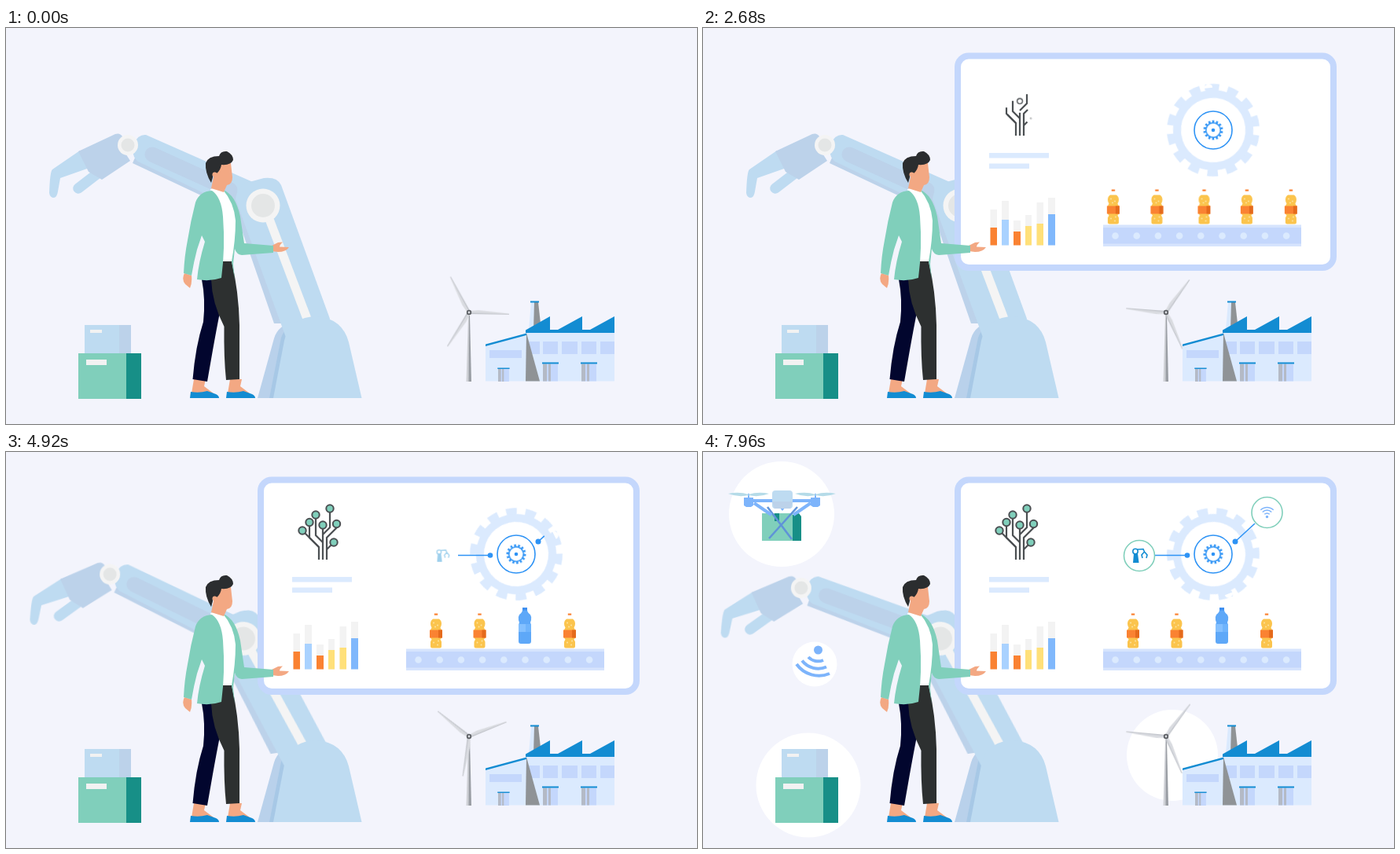
These frames come from a looping animation (879 px wide and 504 px high, 8 s). An HTML page without scripts:

```html
<!DOCTYPE html>
<html lang="en">
<head>
<meta charset="utf-8">
<title>Smart factory</title>
<style>
html, body { margin: 0; width: 100%; height: 100%; overflow: hidden; background: #f3f4fc; }
svg { display: block; width: 100vw; height: 100vh; }
svg * { animation: 8s ease-in-out infinite both; }

.sky { fill: #bedbf1; }
.haze { fill: #bcd2ea; }
.pale { fill: #dbeafe; }
.peri { fill: #c4d7fc; }
.blue { fill: #138cd2; }
.mint { fill: #80cfbb; }
.teal { fill: #178f87; }
.skin { fill: #f3a883; }
.fog { fill: #f4f4f4; }
.stone { fill: #e4e6e6; }
.white { fill: #fff; }
.line { fill: none; stroke: #2e93f5; stroke-width: 1.6; }
.azure { fill: #2e93f5; }

/* groups hidden until their delayed parts start */
.soon { animation-name: soon; animation-timing-function: step-end; }
.mid { animation-name: mid; animation-timing-function: step-end; }
.late { animation-name: late; animation-timing-function: step-end; }
@keyframes soon { 0% { opacity: 0 } 10.5%, 100% { opacity: 1 } }
@keyframes mid { 0% { opacity: 0 } 20%, 100% { opacity: 1 } }
@keyframes late { 0% { opacity: 0 } 50%, 100% { opacity: 1 } }

.pop, .bar, .wipe, .node, .dot, .disc, .icon, .tall { transform-box: fill-box; transform-origin: center; }
.pop { animation-name: pop; }
.bar { transform-origin: bottom; animation-name: bar; }
.wipe { transform-origin: left; animation-name: wipe; }
@keyframes pop { 0%, 13% { transform: scale(0) } 18.5%, 100% { transform: none } }
@keyframes bar { 0%, 14% { transform: scaleY(0) } 20%, 100% { transform: none } }
@keyframes wipe { 0%, 13% { transform: scaleX(0) } 18.5%, 100% { transform: none } }

.panel { fill: #fff; stroke: #c4d7fc; stroke-width: 8; animation-name: wide, high; }
@keyframes wide {
  0%, .5% { width: 0; animation-timing-function: ease-in }
  10.5% { width: 385px; animation-timing-function: ease-out }
  15% { width: 490px } 21%, 100% { width: 478px }
}
@keyframes high {
  0%, .5% { height: 0; animation-timing-function: ease-in }
  10.5% { height: 215px; animation-timing-function: ease-out }
  16% { height: 294px } 23.5% { height: 285.5px } 28%, 100% { height: 269.5px }
}

.gear { transform-origin: 649px 130px; animation-name: gear; animation-timing-function: linear; }
@keyframes gear { to { transform: rotate(250deg) } }
.rotor { transform-origin: 589px 362px; animation-name: rotor; animation-timing-function: linear; }
@keyframes rotor { from { transform: rotate(1deg) } to { transform: rotate(548deg) } }

.slide { animation-name: slide; }
@keyframes slide { 0%, 27.5% { transform: none } 51.25%, 100% { transform: translateX(var(--d, 29px)) } }
.swap { animation-name: swap; }
@keyframes swap { 0%, 53% { opacity: 1 } 57%, 100% { opacity: 0 } }
.tall { transform-origin: bottom; animation-name: tall; }
@keyframes tall {
  0%, 53% { opacity: 0; transform: translateY(5px) scale(.8) }
  57%, 100% { opacity: 1; transform: none }
}

.tick { stroke: #80cfbb; stroke-width: 2.2; animation-name: tick; }
@keyframes tick {
  0%, 21.5% { opacity: 0; transform: translateY(8px) }
  23%, 23.7% { opacity: 1; transform: none }
  25.5% { opacity: 1; transform: translateY(-13px) }
  27%, 100% { opacity: 0; transform: translateY(-13px) }
}
.stem { fill: none; stroke: #4b4f52; stroke-width: 2.2; stroke-dasharray: 1 2; animation-name: stem; }
@keyframes stem { 0%, 25% { stroke-dashoffset: 1.01 } 38%, 100% { stroke-dashoffset: 0 } }
.node { stroke: #4b4f52; stroke-width: 2; animation-name: node; }
@keyframes node {
  0%, 31% { transform: scale(0); fill: #fff }
  35% { transform: none; fill: #fff }
  38%, 100% { transform: none; fill: #80cfbb }
}

.link { stroke-dasharray: 1 2; animation-name: link; }
@keyframes link { 0%, 56% { stroke-dashoffset: 1.01 } 60.5%, 100% { stroke-dashoffset: 0 } }
.dot { animation-name: dot; }
@keyframes dot { 0%, 54.5% { transform: scale(0) } 57%, 100% { transform: none } }
.ring { fill: #fff; stroke: #80cfbb; stroke-width: 1.6; stroke-dasharray: 1 2; animation-name: ring; }
@keyframes ring { 0%, 62.5% { stroke-dashoffset: 1.01 } 69%, 100% { stroke-dashoffset: 0 } }
.icon { animation-name: icon; }
@keyframes icon { 0%, 59.5% { opacity: 0; transform: scale(.75) } 64%, 100% { opacity: 1; transform: none } }
.disc { animation-name: disc; }
@keyframes disc { 0%, 75% { transform: scale(0) } 82%, 100% { transform: none } }

.arm { transform-origin: 397px 411px; animation-name: arm; }
.beam { transform-origin: 327px 226px; animation-name: beam; }
.claw { transform-origin: 155px 149px; animation-name: claw; }
@keyframes arm { 0%, 42.5% { transform: none } 59%, 100% { transform: rotate(-8deg) } }
@keyframes beam {
  0%, 42.5% { transform: none } 60% { transform: rotate(9.6deg) }
  74% { transform: rotate(11.1deg) } 84.5% { transform: rotate(7.1deg); animation-timing-function: ease-out }
  94.5%, 100% { transform: rotate(3.9deg) }
}
@keyframes claw { 0%, 60.5% { transform: none } 74%, 100% { transform: rotate(6.2deg) } }

.drone { animation-name: drone; }
@keyframes drone {
  0%, 62% { transform: translate(410px, 124px); animation-timing-function: linear }
  74% { transform: translate(230px, 85px); animation-timing-function: cubic-bezier(.3, .4, .7, .9) }
  84.5% { transform: translate(111px, 58px); animation-timing-function: ease-out }
  90.5% { transform: translate(99px, 50px) }
  100% { transform: translate(101px, 60px) }
}
</style>
</head>
<body>
<svg viewBox="0 0 879 504" preserveAspectRatio="none">
<defs>
  <clipPath id="belt"><path d="M509 190H761V280H509Z"/></clipPath>
  <g id="bottle">
    <path fill="#fa8232" d="M-2.2-44h4.4v2.2h-4.4z"/>
    <path fill="#fbc44d" d="M-4-37H4Q7-35 7-31Q7-28 5.500-26L7-23V-13L5.500-11L7-8V-2Q7 0 5 0H-5Q-7 0-7-2V-8L-5.500-11L-7-13V-23L-5.500-26Q-7-28-7-31Q-7-35-4-37Z"/>
    <path fill="none" stroke="#fde3a0" stroke-width="1.8" stroke-linecap="round" d="M-3-32h.1M2-29h.1M-3-7h.1M2-4h.1M3-9h.1M-1-27h.1"/>
    <path fill="#fa8232" d="M-8-23H8V-13H-8Z"/><path fill="#e56a1c" d="M3-23H8V-13H3Z"/>
  </g>
  <g id="door">
    <path class="peri" d="M0 2H19V24H0Z"/><path fill="#b4bac6" d="M0 2H5V24H0ZM7 2H10V24H7Z"/>
    <path class="blue" d="M-1 0H20V2H-1Z"/>
  </g>
  <g id="blade">
    <path fill="#d9dbe0" d="M2-2L12-3L51 .5V1.500L2 2Z"/><path fill="#c3c6cc" d="M2 .5L51 1V1.800L2 2Z"/>
  </g>
  <g id="foot">
    <path class="skin" d="M239 447H254L252 456L264 465H236Z"/>
    <path class="blue" d="M235 463Q246 465 256 462L267 466Q271 468 271 471H234Z"/>
  </g>
  <path id="prop" fill="#b5dbe8" d="M-26-2Q-12-5 0-1Q12-5 26-2Q13 3 0 0Q-13 3-26-2Z"/>
</defs>

<path fill="#f3f4fc" d="M0 0H879V504H0Z"/>

<g class="late">
  <circle class="disc white" cx="100" cy="79" r="67"/>
  <circle class="disc white" cx="134" cy="424" r="66.500"/>
  <circle class="disc white" cx="597" cy="386" r="58"/>
  <g class="disc" style="animation-delay:.15s">
    <circle class="white" cx="142" cy="270" r="28.500"/>
    <circle fill="#7db4fb" cx="146.500" cy="252" r="5.500"/>
    <path fill="none" stroke="#7db4fb" stroke-width="4" d="M134 261A17 17 0 0 0 153 265M126 265.500A26 26 0 0 0 157 273.500M119 270A35 35 0 0 0 161 282"/>
  </g>
</g>

<g id="crates">
  <path class="sky" d="M100 378H159V414H100Z"/><path class="haze" d="M144 378H159V414H144Z"/>
  <path class="mint" d="M92 414H172V472H92Z"/><path class="teal" d="M153 414H172V472H153Z"/>
  <path fill="#f2f2f2" d="M107 384H122V388H107ZM102 422H128V429H102Z"/>
</g>

<g id="turbine">
  <path fill="#cfd1d6" d="M588 366H589.500V450H585.500Z"/><path fill="#9a9ea4" d="M589 366H590L592 450H588.500Z"/>
  <g class="rotor"><g transform="translate(589 362)">
    <use href="#blade"/><use href="#blade" transform="rotate(120)"/><use href="#blade" transform="rotate(240)"/>
  </g></g>
  <circle fill="#5d6065" cx="589" cy="362" r="3.200"/><circle fill="#d9dbe0" cx="589" cy="362" r="1.400"/>
</g>

<g id="factory">
  <path class="pale" d="M668 349H673V384H665Z"/><path fill="#8f9396" d="M672 349H677L680 376L671 384Z"/>
  <path class="blue" d="M667 347.500H678V349.500H667Z"/>
  <path class="pale" d="M610 404L662 390V449.500H610ZM662 387H774V449.500H662Z"/>
  <path class="peri" d="M615 410H656V420H615ZM662 399H679V415H662ZM683 399H702V415H683ZM707 399H727V415H707ZM732 399H751V415H732ZM756 399H774V415H756Z"/>
  <path class="blue" d="M610 402.500L662 388.500V391L610 405ZM661 384.500L692 367V384H702L733 367V384H743L774 367V388H661Z"/>
  <path fill="#8f9396" d="M662 388L679 449.500H661Z"/>
  <use href="#door" x="683" y="425.500"/><use href="#door" x="732" y="425.500"/>
  <use href="#door" transform="translate(626 432.500) scale(.73)"/>
</g>

<g id="robot">
  <path fill="#b9d1eb" d="M320 471L341 395Q346 378 366 374L350 471Z"/>
  <path fill="#a7c8e6" d="M335 471L350 394Q355 382 362 378L350 471Z"/>
  <g class="arm">
    <g class="beam">
      <path class="haze" d="M175 140L330 206L318 246L161 172Z"/>
      <path class="sky" d="M178 136L332 204L320 243L168 170Q158 162 163 147Q168 135 178 136Z"/>
      <path fill="none" stroke="#bcd2ea" stroke-width="19" stroke-linecap="round" d="M186 161L285 206"/>
      <g class="claw">
        <path class="sky" d="M94 156L59 180Q56 182 55 210Q56 216 61 216Q65 215 66 208L69 191L106 178Z"/>
        <path fill="none" stroke="#bedbf1" stroke-width="13.500" stroke-linecap="round" d="M118 184L92 204"/>
        <path class="haze" d="M92 157L139 135Q145 133 148 138L147 152L158 169L122 193L105 183Z"/>
        <circle class="fog" cx="155" cy="149" r="13"/><circle class="stone" cx="155" cy="149" r="8.500"/>
      </g>
    </g>
    <path class="haze" d="M291 208L286 217L341 376H365L310 210Z"/>
    <path class="sky" d="M292 218Q294 201 306 197L328 191Q345 189 350 200L412 370L400 410H362Z"/>
    <path fill="none" stroke="#f4f4f4" stroke-width="11" d="M333 238L383 370"/>
    <circle class="fog" cx="327" cy="226" r="21.500"/><circle class="stone" cx="327" cy="226" r="15"/>
  </g>
  <path class="sky" d="M340 471L354 398Q361 367 396 367Q428 370 436 400L452.500 471Z"/>
</g>

<g class="late"><g class="drone">
  <path class="mint" d="M-26 18H13V53H-26Z"/><path class="teal" d="M13 20L21 18L24 22V53H13ZM-10 18H-4V28H-10Z"/>
  <path fill="none" stroke="#5f93d8" stroke-width="2.600" d="M19 10L-17 50M-19 10L12 51"/>
  <path fill="none" stroke="#7db4fb" stroke-width="4" d="M-42 2H42M-36 5L-14 20M36 5L14 20"/>
  <path fill="#7db4fb" d="M-49-2H-37V8L-40 10H-46L-49 8ZM36-2H48V8L45 10H39L36 8ZM-44-7H-42V0H-44ZM41-7H43V0H41ZM-4 10H4L0 15Z"/>
  <rect class="sky" x="-13" y="-11" width="26" height="23" rx="4"/><path class="haze" d="M-13 3H13L10 12H-10Z"/>
  <use href="#prop" x="-43" y="-5"/><use href="#prop" x="42" y="-5"/>
</g></g>

<rect class="panel" x="324" y="35.500" rx="14"/>

<g class="soon">
  <g class="pop"><g class="gear">
    <circle fill="none" stroke="#dbeafe" stroke-width="10" cx="649" cy="130" r="54" pathLength="28" stroke-dasharray="1.1 .9"/>
    <circle fill="none" stroke="#dbeafe" stroke-width="10" cx="649" cy="130" r="46"/>
  </g></g>
  <g class="pop" style="animation-delay:.15s">
    <circle class="line" cx="649" cy="130" r="24"/>
    <g class="gear">
      <circle class="line" stroke-width="2" cx="649" cy="130" r="9.300"/>
      <circle fill="none" stroke="#2e93f5" stroke-width="3" cx="649" cy="130" r="11" pathLength="28" stroke-dasharray="1 1"/>
    </g>
    <circle class="azure" cx="649" cy="130" r="2.300"/>
  </g>

  <path class="wipe pale" d="M364 159H440V165.500H364Z"/>
  <path class="wipe pale" style="animation-delay:.1s" d="M364 172.500H415V179H364Z"/>

  <g fill="#f3f3f3">
    <path class="bar" d="M365.500 276.500V231H374V276.500ZM380 276.500V220H389V276.500ZM395 276.500V245H404V276.500ZM410 276.500V238H418V276.500ZM424.500 276.500V222H433V276.500ZM439 276.500V216H448V276.500Z"/>
  </g>
  <g style="animation-delay:.1s" class="bar">
    <path fill="#fa8232" d="M365.500 254H374V276.500H365.500ZM395 259H404V276.500H395Z"/>
    <path fill="#a9d2ff" d="M380 244H389V276.500H380Z"/>
    <path fill="#ffe079" d="M410 252H418V276.500H410ZM424.500 249H433V276.500H424.500Z"/>
    <path fill="#80b8fc" d="M439 237H448V276.500H439Z"/>
  </g>

  <g class="wipe">
    <path fill="#d6e4fd" d="M509 250.500H761V278H509Z"/><path class="peri" d="M509 254H761V274.500H509Z"/>
    <path fill="none" stroke="#dbeafe" stroke-width="8.600" stroke-linecap="round" stroke-dasharray="0 27.200" d="M524.500 264.500H743"/>
  </g>
  <g clip-path="url(#belt)">
    <g class="slide"><g class="bar" style="animation-delay:.15s"><use href="#bottle" x="518" y="249.500"/></g></g>
    <g class="slide"><g class="bar" style="animation-delay:.18s"><use href="#bottle" x="573.500" y="249.500"/></g></g>
    <g class="slide" style="--d:26px"><g class="swap"><g class="bar" style="animation-delay:.21s"><use href="#bottle" x="634" y="249.500"/></g></g></g>
    <g class="slide"><g class="bar" style="animation-delay:.24s"><use href="#bottle" x="688" y="249.500"/></g></g>
    <g class="slide"><g class="bar" style="animation-delay:.27s"><use href="#bottle" x="744" y="249.500"/></g></g>
  </g>
  <g class="tall">
    <path fill="#5ea8f8" d="M657 201H663Q663 204 667 207Q669 210 668 214L667 217L668 220V241Q668 244 665 244H655Q652 244 652 241V220L653 217L652 214Q651 210 653 207Q657 204 657 201Z"/>
    <path fill="#3f8ff0" d="M657 198H663V201.500H657Z"/><path fill="#84c0ff" d="M652 219H668V229H652Z"/>
    <path fill="#6fb4fc" d="M661 219H668V229H661Z"/>
  </g>
</g>

<g class="mid">
  <path class="tick" d="M403 138V150"/>
  <path class="stem" pathLength="1" d="M398 137V121L380 103"/>
  <path class="stem" pathLength="1" d="M398 121L386 109V93"/>
  <path class="stem" pathLength="1" d="M403 137V98"/>
  <path class="stem" pathLength="1" d="M403 115L394 106V84"/>
  <path class="stem" pathLength="1" d="M403 105L412 96V76"/>
  <path class="stem" pathLength="1" d="M408 137V109L420 97V95"/>
  <path class="stem" pathLength="1" d="M408 124L414 118"/>
  <circle class="node" cx="403" cy="93" r="4.700"/>
  <circle class="node" style="animation-delay:.1s" cx="417" cy="115" r="4.700"/>
  <circle class="node" style="animation-delay:.2s" cx="420.500" cy="91.500" r="4.700"/>
  <circle class="node" style="animation-delay:.3s" cx="412" cy="72" r="4.700"/>
  <circle class="node" style="animation-delay:.4s" cx="394" cy="80" r="4.700"/>
  <circle class="node" style="animation-delay:.71s" cx="377" cy="100" r="4.700"/>
  <circle class="node" style="animation-delay:.86s" cx="386" cy="89.500" r="4.700"/>
</g>

<g class="late">
  <path class="line link" pathLength="1" d="M616 131.500H575"/>
  <path class="line link" style="animation-delay:.3s" pathLength="1" d="M677 114L702 91"/>
  <circle class="dot azure" cx="616" cy="131.500" r="3.300"/>
  <circle class="dot azure" style="animation-delay:.3s" cx="677" cy="114" r="3.500"/>
  <circle class="ring" pathLength="1" cx="555" cy="132" r="19.500"/>
  <circle class="ring" style="animation-delay:.15s" pathLength="1" cx="717.500" cy="77" r="19.500"/>
  <g class="icon" fill="none" stroke="#138cd2" stroke-width="1.600">
    <path class="blue" stroke="none" d="M548 129H553L554.500 141H547Z"/>
    <circle cx="550" cy="126.500" r="3.200"/>
    <path d="M552.500 124L560 123.500L561.500 127M561.500 127L558 131L559 135M561.500 127L565 131L564 135"/>
  </g>
  <g class="icon" style="animation-delay:.4s">
    <circle fill="#7db4fb" cx="717.500" cy="82.500" r="1.700"/>
    <path fill="none" stroke="#7db4fb" stroke-width="1.500" d="M714.300 79.300A4.500 4.500 0 0 1 720.700 79.300M711.800 76.500A8 8 0 0 1 723.200 76.500M709.300 73.800A11.600 11.600 0 0 1 725.700 73.800"/>
  </g>
</g>

<g id="man">
  <use href="#foot"/><use href="#foot" x="46"/>
  <path fill="#02062e" d="M249 320H263Q266 350 272 362Q268 382 263 410L256 450L237.500 447Q241 405 251 374Q254 345 249 320Z"/>
  <path fill="#2d3030" d="M261 320L274 317V297H287Q296 335 297 378V447L280 448Q277 420 277.500 380Q262 350 261 320Z"/>
  <path class="skin" d="M227 312L236 315Q237 324 234 331L228 326Q223 320 227 312ZM338 277L346 273L352 272.500Q348 276 348 278.500L360 279Q356 285 346 285L338 284Z"/>
  <path class="white" d="M260 205Q272 201 281 210Q291 225 293 245L294 270L288 297H273L270 240Z"/>
  <path class="mint" d="M262 207Q246 208 241 222Q235 245 231 270Q227 290 226 312L236 315Q239 297 243 282L249 264L253 272Q245 298 243 320Q260 323 274 318Q279 280 276 240Q274 215 262 207Z"/>
  <path class="mint" d="M276 206Q292 212 298 240L303 274L340 277V286L300 289Q293 288 291 281L289 300L291 320L287 297Q292 270 292 245Q290 222 276 206Z"/>
  <path class="skin" d="M264 172H286L288 190Q288 199 281 200L277 209L261 204L264 190Z"/>
  <path fill="#2b2d2f" d="M261 197Q253 184 254 172Q257 163 271 163Q273 156 281 157Q289 161 289 168Q286 175 274 174Q273 181 268 185Q262 181 263 190Z"/>
  <circle class="skin" cx="265.500" cy="186.500" r="3"/>
</g>
</svg>
</body>
</html>
```
